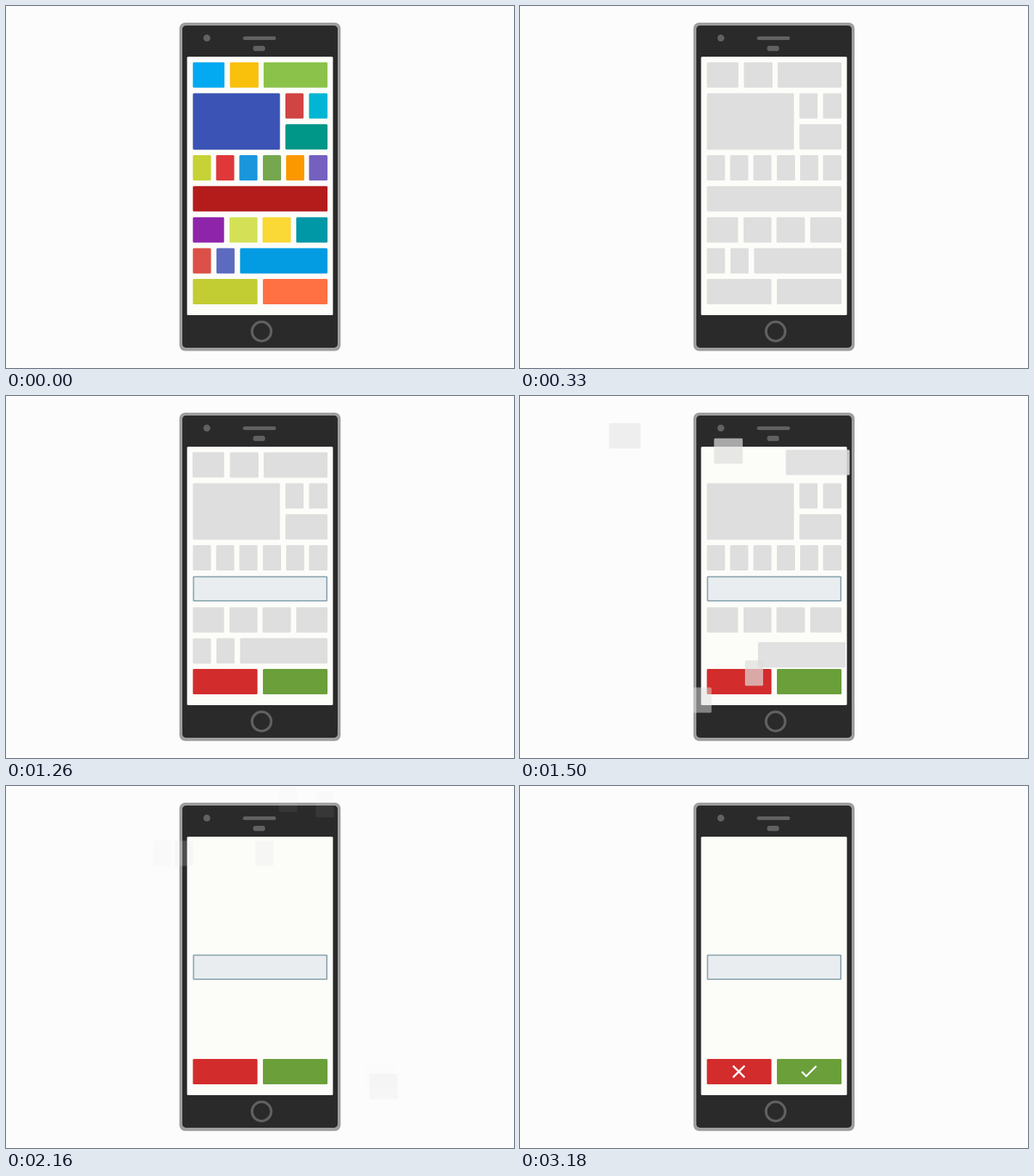
An HTML page with a canvas for the animation above (3.63 s loop, 700 by 500 pixels).

```html
<!DOCTYPE html>
<html lang="en">
<head>
<meta charset="utf-8">
<title>Layout reduction</title>
<style>
html, body { margin: 0; width: 100%; height: 100%; overflow: hidden; background: #fcfcfc; }
canvas { display: block; width: 700px; height: 500px; }
</style>
</head>
<body>
<canvas id="stage" width="700" height="500"></canvas>
<script>
const ctx = document.getElementById('stage').getContext('2d');
const LOOP = 3630, STEP = 30, FLIGHT = 450;
const GREY = [222, 222, 222];

// Tiles: left, right, colour, then launch time and travel by the end of the flight
const rows = [
  [[257.5, 301, '#03a9f1', 1245, -420, -125],
   [308.5, 348, '#f9c00c', 1335, -306, -142],
   [355, 443, '#8bc34a', 1412, 295, -92]],
  [[257.5, 377.5, '#3a53b4', 1575, -133, -293, 78],
   [385, 410, '#d04444', 1735, -10, -134],
   [417.5, 443, '#00b6d4', 1650, 148, -246]],
  [[385, 443, '#009688', 1610, 297, -119]],
  [[257.5, 282.5, '#c6d235', 1600, -252, -199],
   [289.5, 314.5, '#e0383a', 1740, -100, -150],
   [321.5, 346.5, '#1a96dd', 1785, -128, -188],
   [354, 379, '#76a64e', 1785, -15, -188],
   [386, 411, '#fb9800', 1740, 47, -227],
   [417.5, 443, '#7560c0', 1610, 170, -230]],
  [],
  [[257.5, 300.5, '#8e24aa', 1500, -282, 189],
   [308, 346.5, '#d4e157', 1590, -206, 150],
   [353.5, 392.5, '#fad835', 1790, 218, 157],
   [400, 443, '#0097a7', 1725, 100, 100]],
  [[257.5, 282.5, '#dc5048', 1245, -58, 212],
   [290, 315, '#5c6bc0', 1335, 149, 228],
   [322.5, 443, '#039be2', 1412, 144, 145]]
];
const rowY = i => 77.7 + 42.8 * i;

const clamp = v => Math.max(0, Math.min(1, v));
const span = (t, from, len) => clamp((t - from) / len);
const smooth = p => (1 - Math.cos(Math.PI * p)) / 2;
const rgb = hex => [1, 3, 5].map(i => parseInt(hex.slice(i, i + 2), 16));
const mix = (a, b, p) => `rgb(${a.map((v, i) => Math.round(v + (b[i] - v) * p))})`;

function box(x, y, w, h, r, fill) {
  ctx.fillStyle = fill;
  ctx.beginPath();
  ctx.roundRect(x, y, w, h, r);
  ctx.fill();
}

function drawPhone() {
  box(239, 23, 222, 453.5, 8, '#9e9e9e');
  box(243, 27, 214, 445, 5, '#2a2a2a');
  box(272, 39.5, 9.6, 9.6, 4.8, '#616161');
  box(326.5, 42, 45.5, 5, 2.5, '#616161');
  box(340.5, 55, 16.5, 7.2, 3.2, '#616161');
  box(249.5, 70, 201, 357, 1.5, '#fcfcf9');
  ctx.strokeStyle = '#616161';
  ctx.lineWidth = 3.6;
  ctx.beginPath();
  ctx.arc(352.2, 449.5, 13.2, 0, Math.PI * 2);
  ctx.stroke();
}

function drawBar(t, fade) {
  const tint = smooth(span(t, 785, 275));
  const y = rowY(4) - 0.2 - 16 * smooth(span(t, 1800, 330));
  const base = mix(rgb('#b41c1c'), GREY, fade);
  box(257.5, y, 185.5, 35, 1.5, tint ? mix(GREY, rgb('#8ba5af'), tint) : base);
  if (tint) box(259.3, y + 1.8, 181.9, 31.4, 0.5, mix(GREY, rgb('#e9edef'), tint));
}

function drawButton(t, fade, x, first, last, start) {
  const tint = smooth(span(t, start, 270));
  const fill = tint ? mix(GREY, rgb(last), tint) : mix(rgb(first), GREY, fade);
  box(x, rowY(7) - 0.2, 89, 35, 1.5, fill);
}

function drawTile([x, right, colour, start, dx, dy, h = 35], y, t, fade) {
  const p = span(t, start, FLIGHT);
  if (p === 1) return;
  const move = p * p;
  ctx.globalAlpha = 1 - Math.pow(p, 1.2);
  box(x + dx * move, y + dy * move, right - x, h, 1.5, mix(rgb(colour), GREY, fade));
  ctx.globalAlpha = 1;
}

// Icon strokes spin and grow in around the button centre
function drawIcon(t, start, cx, cy, lines) {
  const p = span(t, start, 500);
  if (!p) return;
  const size = 1 - Math.pow(1 - p, 3);
  ctx.save();
  ctx.translate(cx, cy);
  ctx.rotate(Math.PI * (smooth(p) - 1));
  ctx.scale(size, size);
  ctx.strokeStyle = '#fff';
  ctx.lineWidth = 2.5;
  ctx.beginPath();
  for (const [from, ...rest] of lines) {
    ctx.moveTo(...from);
    rest.forEach(pt => ctx.lineTo(...pt));
  }
  ctx.stroke();
  ctx.restore();
}

function draw(t) {
  const fade = smooth(span(t, 30, 300));
  ctx.fillStyle = '#fcfcfc';
  ctx.fillRect(0, 0, 700, 500);
  drawPhone();
  drawBar(t, fade);
  drawButton(t, fade, 257.5, '#c2cc33', '#d32c2c', 705);
  drawButton(t, fade, 354, '#ff7043', '#6a9f3a', 650);
  rows.forEach((row, i) => row.forEach(tile => drawTile(tile, rowY(i), t, fade)));
  drawIcon(t, 2440, 301.5, 394.5, [[[-8, -8], [8, 8]], [[8, -8], [-8, 8]]]);
  drawIcon(t, 2680, 398.3, 394.5, [[[-10, 0.2], [-3.9, 6.3], [10, -7.6]]]);
}

const began = performance.now();
function tick() {
  const t = (performance.now() - began) % LOOP;
  draw(Math.floor(t / STEP) * STEP);
  requestAnimationFrame(tick);
}
tick();
</script>
</body>
</html>
```
